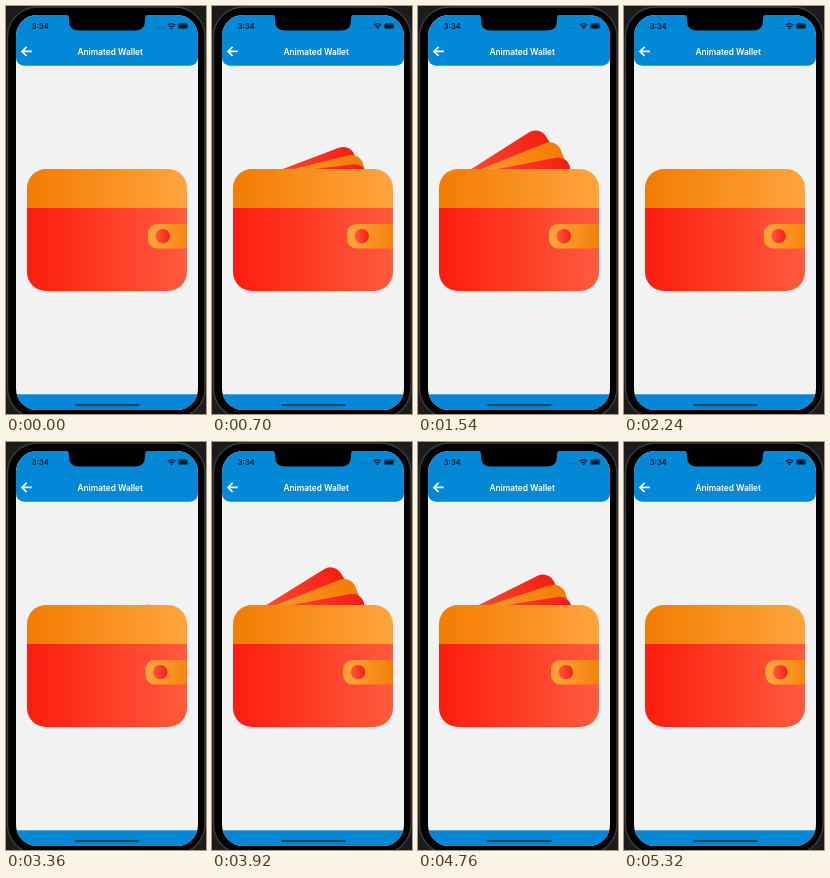
An HTML page for the animation above (5.46 s loop, 200x408 px).

```html
<!DOCTYPE html>
<html lang="en">
<head>
<meta charset="utf-8">
<title>Animated Wallet</title>
<style>
  html, body { margin: 0; width: 100%; height: 100%; overflow: hidden; background: #000; }
  svg { display: block; width: 100%; height: 100%; }
  text { font-family: Inter, "Liberation Sans", sans-serif; font-weight: 600; }
</style>
</head>
<body>
<svg viewBox="0 0 200 408" xmlns="http://www.w3.org/2000/svg">
  <defs>
    <linearGradient id="red"><stop stop-color="#fc1d0f"/><stop offset="1" stop-color="#ff5b3d"/></linearGradient>
    <linearGradient id="orange"><stop stop-color="#f37c02"/><stop offset="1" stop-color="#ffa53e"/></linearGradient>
    <linearGradient id="redBack"><stop stop-color="#ff5b3d"/><stop offset="1" stop-color="#f51d12"/></linearGradient>
    <linearGradient id="orangeBack"><stop stop-color="#ffa53e"/><stop offset="1" stop-color="#f37c02"/></linearGradient>
    <clipPath id="screen"><rect x="10" y="9" width="182" height="395" rx="21"/></clipPath>
    <clipPath id="wallet"><rect x="21" y="163" width="160" height="122" rx="19"/></clipPath>
  </defs>

  <!-- phone -->
  <rect width="200" height="408" fill="#1c1c1c"/>
  <rect x="1.500" y="1" width="197.500" height="411" rx="30" fill="#000" stroke="#3c3c3c" stroke-width="1.400"/>
  <g clip-path="url(#screen)">
    <rect x="10" y="9" width="182" height="395" fill="#f2f2f2"/>
    <rect x="10" y="-10" width="182" height="69.700" rx="8" fill="#0288d6"/>
    <rect x="10" y="388.300" width="182" height="16" fill="#0288d6"/>
  </g>
  <path d="M60 8.500q3 .5 3 4v2q0 10 10 10h56q10 0 10-10v-2q0-3.500 3-4z" fill="#000"/>
  <rect x="69" y="398" width="64.500" height="2.200" rx="1.100" fill="#1c4a68"/>

  <!-- status bar and header -->
  <text x="34.200" y="22.900" font-size="7.500" text-anchor="middle" fill="#06182a">3:34</text>
  <g fill="none" stroke="#06182a">
    <path d="M151 21.800h8" stroke-width="1" stroke-dasharray="1 1.300" opacity=".4"/>
    <path d="M161.800 19.200q3.700-3 7.400 0M163.300 21q2.200-1.700 4.400 0" stroke-width="1.300"/>
    <rect x="172.400" y="17.600" width="9.300" height="5" rx="1.500" stroke-width=".6"/>
  </g>
  <g fill="#06182a">
    <circle cx="165.500" cy="22.300" r=".9"/>
    <rect x="173" y="18.200" width="8.100" height="3.800" rx=".9"/>
  </g>
  <path d="M25.800 45.400H16.500M20.600 40.800l-4.600 4.600 4.600 4.600" fill="none" stroke="#fff" stroke-width="1.700"/>
  <text x="104.200" y="48.500" font-size="8.300" text-anchor="middle" fill="#fff">Animated Wallet</text>

  <g id="cards"></g>

  <!-- wallet -->
  <g clip-path="url(#wallet)">
    <rect x="21" y="163" width="160" height="40" fill="url(#orange)"/>
    <rect x="21" y="202" width="160" height="83" fill="url(#red)"/>
    <g id="clasp">
      <rect x="142" y="218" width="54" height="24.500" rx="9" fill="url(#orangeBack)"/>
      <circle cx="156.800" cy="230.200" r="7.200" fill="url(#redBack)"/>
    </g>
  </g>
</svg>
<script>
  const LOOP = 5460, STEP = 140, MOVE = 950;
  const PIVOT = { x: 44.3, y: 211 };
  const CORNER = 12;
  const VISITS = [{ open: 140, close: 1570 }, { open: 3060, close: 4490 }];

  // reach and rest place the top right corner's centre as seen from the pivot
  const CARDS = [
    { fill: "redBack", reach: 104.5, rest: 13, turn: 32.5 },
    { fill: "orangeBack", reach: 107.5, rest: 13.7, turn: 22 },
    { fill: "redBack", reach: 107, rest: 15.4, turn: 11 }
  ];

  const cards = document.getElementById("cards");
  const clasp = document.getElementById("clasp");

  function makeCard({ fill, reach, rest }) {
    const angle = rest * Math.PI / 180;
    const card = document.createElementNS("http://www.w3.org/2000/svg", "rect");
    const attributes = {
      x: PIVOT.x,
      y: PIVOT.y - reach * Math.sin(angle) - CORNER,
      width: reach * Math.cos(angle) + CORNER,
      height: 78,
      rx: CORNER,
      fill: `url(#${fill})`
    };
    for (const name in attributes) card.setAttribute(name, attributes[name]);
    return cards.appendChild(card);
  }

  const shapes = CARDS.map(makeCard);

  function ease(elapsed) {
    const k = Math.min(1, Math.max(0, elapsed / MOVE));
    return (1 - Math.cos(Math.PI * k)) / 2;
  }

  const openness = time =>
    VISITS.reduce((sum, v) => sum + ease(time - v.open) - ease(time - v.close), 0);

  function draw(time) {
    const p = openness(time);
    clasp.setAttribute("transform", `translate(${-11 * p} 0)`);
    shapes.forEach((shape, i) =>
      shape.setAttribute("transform", `rotate(${-CARDS[i].turn * p} ${PIVOT.x} ${PIVOT.y})`));
  }

  const start = performance.now();
  function tick() {
    const time = (performance.now() - start) % LOOP;
    draw(Math.floor(time / STEP) * STEP);
    requestAnimationFrame(tick);
  }
  tick();
</script>
</body>
</html>
```
